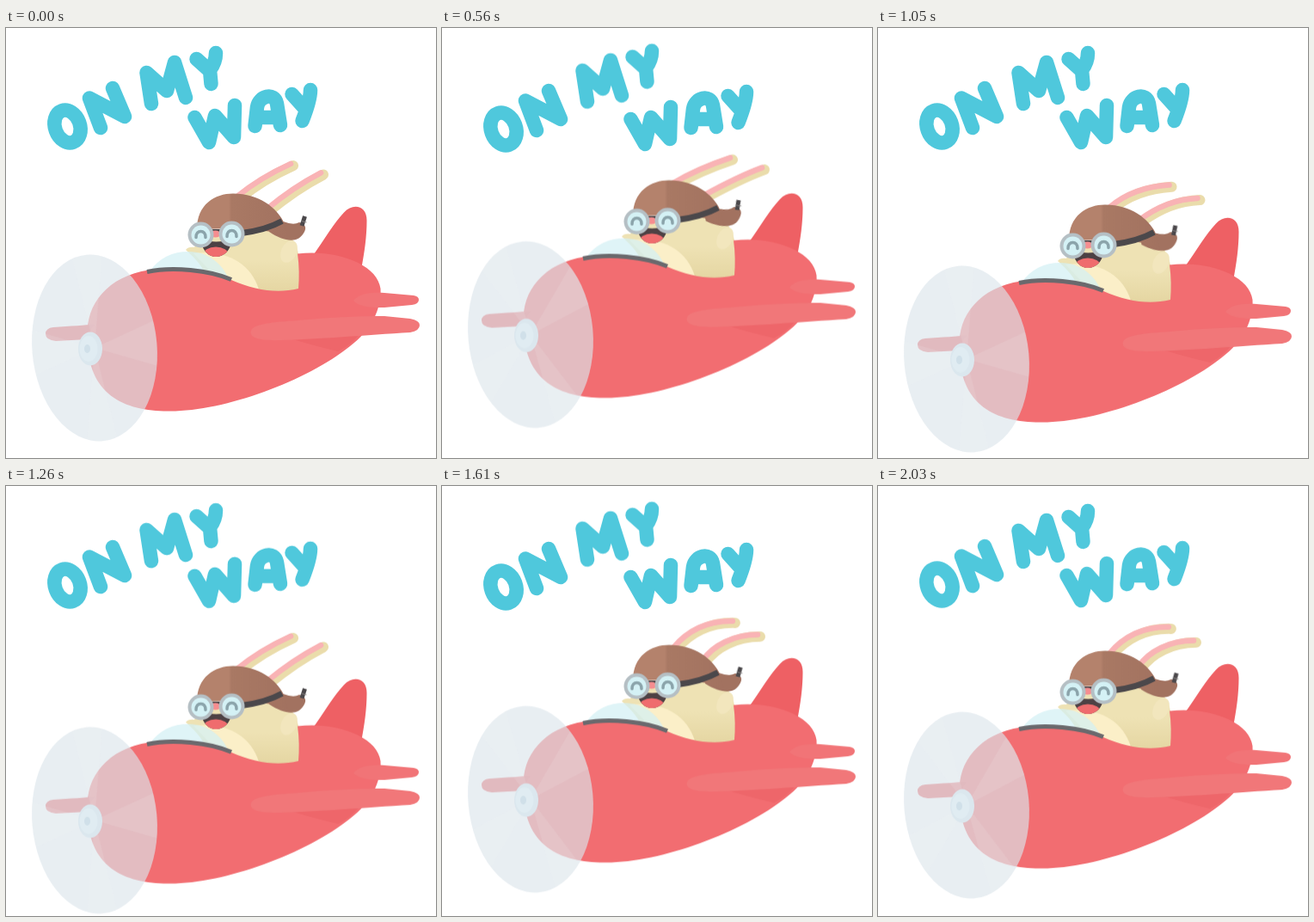
Recreate the animation shown at these times as an HTML page without scripts. Size 500 px wide and 500 px high, loop 2.1 s.

```html
<!DOCTYPE html>
<html lang="en">
<head>
<meta charset="utf-8">
<title>On my way</title>
<style>
  html, body { margin: 0; width: 100%; height: 100%; overflow: hidden; background: #fff; }
  svg { display: block; width: 100%; height: 100%; }
  .words { fill: none; stroke: #4fc8dc; stroke-width: 16.5; stroke-linecap: round; stroke-linejoin: round; }
  .words g { animation: sway 525ms cubic-bezier(.37,0,.63,1) infinite alternate; }
  .on { --dy: 3px; }
  .my { --dy: -2.5px; }
  .way { --dy: 2px; }
  .plane { animation: fly 2100ms cubic-bezier(.37,0,.63,1) infinite; }
  .blades { animation: spin 840ms linear infinite; }
  .tail { transform-origin: 325px 234px; animation: flutter 420ms ease-in-out infinite; }
  .ears { fill: none; stroke-linecap: round; }
  .strap { fill: none; stroke: #4b484b; }
  .eye { fill: none; stroke: #8ba4ab; stroke-width: 3.5; stroke-linecap: round; }
  @keyframes sway { to { transform: translateY(var(--dy)); } }
  @keyframes fly {
    0% { transform: none; animation-timing-function: cubic-bezier(.39,.575,.565,1); }
    21% { transform: translateY(-17.4px); }
    58.5% { transform: translateY(17px); }
    82% { transform: translateY(-11px); }
    100% { transform: none; }
  }
  @keyframes spin { to { transform: rotate(360deg); } }
  @keyframes flutter {
    33.3% { transform: rotate(-9deg); }
    66.7% { transform: rotate(-3deg); }
  }
</style>
</head>
<body>
<svg viewBox="0 0 500 500" role="img" aria-label="ON MY WAY">
  <defs>
    <linearGradient id="cap">
      <stop offset=".35" stop-color="#b4826c"/>
      <stop offset=".38" stop-color="#a97964"/>
      <stop offset="1" stop-color="#a27260"/>
    </linearGradient>
    <linearGradient id="fur" x2="0" y2="1">
      <stop offset=".6" stop-color="#eee2b4"/>
      <stop offset="1" stop-color="#e5d6a2"/>
    </linearGradient>
    <path id="blade" d="M0,0 L-.24,-.97 A1,1 0 0 1 .24,-.97Z"/>
    <g id="lens">
      <circle r="15" fill="#b5bfc4"/>
      <circle r="11" fill="#d4f1f5"/>
      <path class="eye" d="M-5.5,3 C-6,-6.500 6,-6.500 5.500,3"/>
    </g>
    <clipPath id="mouth"><path d="M227,246 Q244,251 262,246 C262,258 254,266 244,266 C234,266 227,256 227,246Z"/></clipPath>
  </defs>

  <g class="words">
    <g class="on">
      <ellipse cx="71.5" cy="114.5" rx="14.5" ry="19.5" transform="rotate(-20 71.5 114.5)"/>
      <path d="M110,116 L97,81.5 L138,103 L124,70"/>
    </g>
    <g class="my">
      <path d="M169,88 L163.500,52 L187,73 L196,40 L209,81"/>
      <path d="M221.500,36 L236,49 M244,29 Q244,40 237,49 L238.500,65"/>
    </g>
    <g class="way">
      <path d="M219.500,104 L236,133 L243,102 L265,127 L266,90"/>
      <path d="M289.500,114 L292,92 C294,79 312,74 315,88 L319,113 M292,104 L316,104"/>
      <path d="M332.500,77 L346,92 M354,72 Q354,84 344.500,108"/>
    </g>
  </g>

  <g class="plane">
    <path fill="#ee6064" d="M356,266 C370,246 382,226 393,214.500 C403,203 420,206 419.500,224 C419.500,242 417,260 413,281Z"/>

    <g class="ears">
      <path id="ear1" d="M272,198 C290,183 312,170 334,160">
        <animate attributeName="d" dur="420ms" repeatCount="indefinite" keyTimes="0;.333;.667;.833;1"
          values="M272,198 C290,183 312,170 334,160;M272,198 C290,187 313,177 338,168.500;M272,198 C290,178 315,170 345,175;M272,198 C288,178 312,166 341,167;M272,198 C290,183 312,170 334,160"/>
      </path>
      <path id="ear2" d="M306,213 C325,197 347,182 369,170.500">
        <animate attributeName="d" dur="420ms" repeatCount="indefinite" keyTimes="0;.333;.667;.833;1"
          values="M306,213 C325,197 347,182 369,170.500;M306,213 C328,201 351,189 375,180;M306,213 C320,198 345,187 374,194;M306,213 C318,195 342,183 370,183;M306,213 C325,197 347,182 369,170.500"/>
      </path>
      <g stroke="#eadcab" stroke-width="12">
        <use href="#ear1"/><use href="#ear2"/>
      </g>
      <g stroke="#f9b3b5" stroke-width="6.500" transform="translate(-3 -2.200)">
        <use href="#ear1"/><use href="#ear2"/>
      </g>
    </g>

    <path fill="url(#fur)" d="M225,243 L219,255 Q212,254 209,258 C215,264 226,272 234,290 L262,296 C290,309 320,309 342,304 L342,262 L325,230 L300,215Z"/>
    <path fill="#fff" d="M325,230 C333,240 338,251 340,263 L350,263 L350,230Z"/>
    <path fill="#fbefc8" d="M218,262 C255,258 284,272 294,304 L250,296Z"/>
    <ellipse cx="329" cy="260" rx="9" ry="13.5" transform="rotate(25 329 260)" fill="#f2e6bd"/>

    <g class="tail">
      <path fill="#a27260" d="M306,216 Q330,232 341,226 Q351,229 347,237 C340,251 324,249 306,237Z"/>
      <path class="strap" stroke-width="5" d="M344,230 L347.5,219"/>
      <path stroke="#85807f" d="M343.5,224.5 l6,1.5"/>
    </g>
    <path fill="url(#cap)" d="M222,234 C222,205 243,192.500 264,192.500 C295,192.500 315,210 322,224 L328,245 C317,242 311,236 300,236 Q284,242 272,233Z"/>
    <path class="strap" stroke-width="7" d="M274,238.500 Q302,235 321,224.500"/>

    <g clip-path="url(#mouth)">
      <path fill="#4d4144" d="M225,244 h40 v25 h-40z"/>
      <ellipse cx="244" cy="263.500" rx="15" ry="9" fill="#ef6c6e"/>
    </g>
    <path class="strap" stroke-width="4" d="M236,236 H253"/>
    <ellipse cx="243.500" cy="239.500" rx="6" ry="4" fill="#f68d8f"/>
    <use href="#lens" x="226.500" y="240.500"/>
    <use href="#lens" x="262.500" y="239.500"/>

    <path fill="#d3f0f4" fill-opacity=".72" d="M167,283 C178,267 194,260 212,260 C236,260 252,275 259,292Z"/>
    <path fill="#f26d71" d="M95,358 C92,322 119,288 166,281.500 C200,277 237,282 262,293 C290,305 315,309 340,303 C341,290 341,277 339,262.500 C385,257 432,275 435.500,303 C437,327 424,352 400,370 C349,411 253,446 190,445.500 C140,446 93,428 95,358Z"/>
    <path fill="#ee666a" d="M330,361 L411,356 Q401,369 386,376 Q360,370 330,361Z"/>
    <path fill="none" stroke="#6a696d" stroke-width="5" d="M164,283.500 C193,277 237,281.500 262,292.500"/>

    <path fill="#f17477" d="M404,317 C410,310 420,307 440,308 L474,311 Q480,312 480,316 Q480,321 472,322 L440,325 Q412,326 404,317Z"/>
    <path fill="#f17779" d="M285,352 C288,344 310,342 340,340 C380,336 420,335 440,335 L470,338 Q481,340 481,345.500 Q481,352 470,354 C420,357 360,362 320,363 C295,364 282,360 285,352Z"/>
    <path fill="#ec666a" d="M46,355.500 Q46,349 55,348 C75,347 92,345 103,345 Q96,352 95,362 L58,364 Q46,363 46,355.500Z"/>

    <g transform="translate(103 372) rotate(-5) scale(72.600 108.700)">
      <circle r="1" fill="#dde6eb" fill-opacity=".66"/>
      <g class="blades" fill="#f4f2f5" fill-opacity=".12">
        <use href="#blade"/>
        <use href="#blade" transform="rotate(90)"/>
        <use href="#blade" transform="rotate(180)"/>
        <use href="#blade" transform="rotate(270)"/>
      </g>
    </g>
    <ellipse cx="98" cy="373" rx="14" ry="19.500" fill="#dbe7ee"/>
    <ellipse cx="96" cy="373" rx="10.500" ry="15" fill="#e0ecf2"/>
    <ellipse cx="94.500" cy="373" rx="3.500" ry="5" fill="#d0e0e9"/>
  </g>
</svg>
</body>
</html>
```
